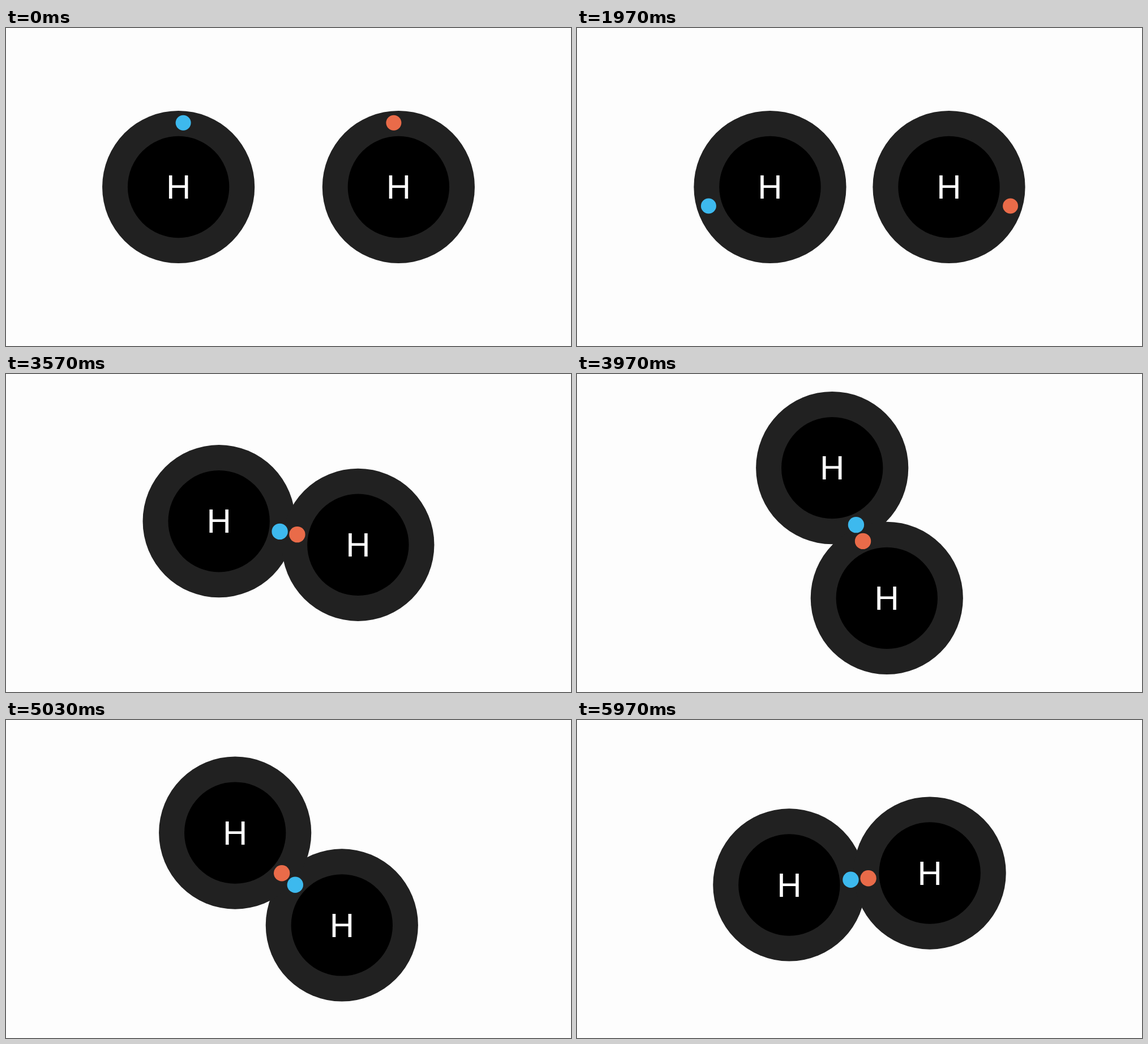
These frames come from a looping animation (998x561 px, 6010 ms). An HTML page with a canvas:

```html
<!DOCTYPE html>
<html lang="en">
<head>
<meta charset="utf-8">
<title>Two atoms form a bond</title>
<style>
  html, body { margin: 0; width: 100%; height: 100%; overflow: hidden; background: #fdfdfd; }
  canvas { display: block; }
</style>
</head>
<body>
<canvas id="stage" width="998" height="561"></canvas>
<script>
const ctx = document.getElementById("stage").getContext("2d");
const LOOP = 6010, STEP = 1000 / 30, LAST = 179;
const MEET = 3500, SPIN = 2500;
const CX = 499, CY = 280.5;
const SHELL = 134.6, CORE = 89.7, ORBIT = 113.6;
const BLUE = "#3db9ee", RED = "#e96b49";

function disc(x, y, r, color) {
  ctx.fillStyle = color;
  ctx.beginPath();
  ctx.arc(x, y, r, 0, 2 * Math.PI);
  ctx.fill();
}

function atom(x, y) {
  disc(x, y, SHELL, "#212121");
  disc(x, y, CORE, "#000");
  ctx.fillStyle = "#fff";
  ctx.fillText("H", x, y + 20.6);
}

// Atoms drift together while each electron circles its own atom.
function approach(t) {
  const gap = 195 - 0.0188 * t;
  const a = 2.5 * Math.PI * t / MEET;
  const dx = ORBIT * Math.sin(a), dy = -ORBIT * Math.cos(a);
  atom(CX - gap, CY);
  atom(CX + gap, CY);
  disc(CX - gap + dx, CY + dy, 13.5, BLUE);
  disc(CX + gap - dx, CY + dy, 13.5, RED);
}

// The bonded pair turns once around the middle.
function spin(t) {
  const a = 2 * Math.PI * (t - MEET) / SPIN;
  const ux = -Math.cos(a), uy = -Math.sin(a);
  for (const s of [1, -1]) atom(CX + s * 124.6 * ux, CY + s * 124.6 * uy);
  disc(CX + 15.6 * ux, CY + 15.6 * uy, 14.2, BLUE);
  disc(CX - 15.6 * ux, CY - 15.6 * uy, 14.2, RED);
}

function draw(now) {
  const step = Math.floor((now % LOOP + 5) / STEP);
  const t = Math.min(LAST, Math.max(1, step)) * STEP;
  ctx.fillStyle = "#fdfdfd";
  ctx.fillRect(0, 0, 998, 561);
  ctx.font = "60px 'Liberation Sans', Arial, sans-serif";
  ctx.textAlign = "center";
  (t < MEET ? approach : spin)(t);
}

let start;
function tick(now) {
  start ??= now;
  draw(now - start);
  requestAnimationFrame(tick);
}
requestAnimationFrame(tick);
</script>
</body>
</html>
```
